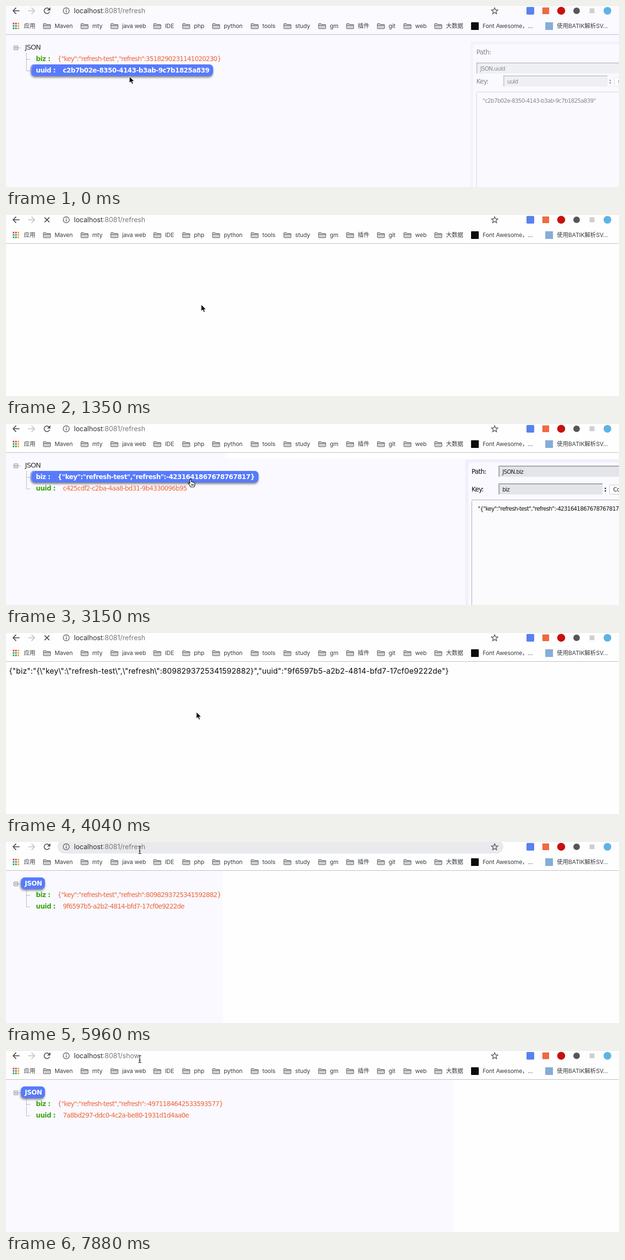
Animation, 1272 px wide and 378 px high, one loop 8 s. Source, as an HTML page with a canvas:

```html
<!DOCTYPE html>
<html lang="zh">
<head>
<meta charset="utf-8">
<title>JSON refresh</title>
<style>
html, body { margin: 0; width: 100%; height: 100%; overflow: hidden; background: #fff; }
canvas { display: block; width: 1272px; height: 378px; }
</style>
</head>
<body>
<canvas id="stage" width="1272" height="378"></canvas>
<script>
const W = 1272, H = 378, LOOP = 8000, TICK = LOOP / 54;
const ctx = document.getElementById('stage').getContext('2d');
const TREE = '"DejaVu Sans", sans-serif';
const UI = 'Inter, "Noto Sans CJK SC", "Noto Sans CJK", sans-serif';
const LAV = '#f9f9ff', BLUE = '#587bfc', RED = '#f0653a', GREEN = '#3ba50c';

const DATA = [
  ['3518290231141020230', 'c2b7b02e-8350-4143-b3ab-9c7b1825a839'],
  ['-4231641867678767817', 'c425cdf2-c2ba-4aa8-bd31-9b4330096b95'],
  ['8098293725341592882', '9f6597b5-a2b2-4814-bfd7-17cf0e9222de'],
  ['-4971184642533593577', '7a8bd297-ddc0-4c2a-be80-1931d1d4aa0e']
].map(([n, uuid]) => ({ uuid, biz: `{"key":"refresh-test","refresh":${n}}` }));

// start time, page kind, data index
const PAGES = [
  [0, 'tree', 0], [1200, 'raw', 1], [1350, 'blank', 1], [1800, 'tree', 1],
  [4040, 'raw', 2], [4790, 'blank', 2], [5080, 'tree', 2],
  [7150, 'raw', 3], [7440, 'blank', 3], [7590, 'tree', 3]
];
const SELECT = [[0, 'uuid'], [450, 'biz'], [1200, 'root'], [2550, 'uuid'], [3000, 'biz'], [4040, 'root']];
const POINTER = [
  [0, 256, 147], [140, 256, 147], [430, 310, 112], [600, 330, 115], [1000, 405, 187],
  [1800, 405, 187], [2350, 356, 142], [2600, 356, 142], [2950, 383, 115], [3290, 383, 115],
  [3700, 395, 165], [4040, 395, 165], [4580, 350, 111], [5180, 350, 111], [5900, 277, 17], [8000, 277, 17]
];
const FOLDERS = [
  [77, 'Maven'], [155, 'mty'], [217, 'java web'], [306, 'IDE'], [366, 'php'], [428, 'python'], [508, 'tools'],
  [576, 'study'], [648, 'gm'], [706, '插件'], [770, 'git'], [825, 'web'], [889, '大数据']
];

const at = (list, t) => list.filter(e => e[0] <= t).pop();
const within = (t, a, b) => t >= a && t < b;

function pointerAt(t) {
  const q = Math.floor(t / TICK + 1e-6) * TICK;
  const i = POINTER.findIndex(p => p[0] > q);
  const a = POINTER[i - 1], b = POINTER[i];
  const u = (q - a[0]) / (b[0] - a[0]);
  const e = u * u * (3 - 2 * u);
  return { x: Math.round(a[1] + (b[1] - a[1]) * e), y: Math.round(a[2] + (b[2] - a[2]) * e) };
}

function text(s, x, y, font, color, gap = 0) {
  ctx.font = font;
  ctx.letterSpacing = gap + 'px';
  ctx.fillStyle = color;
  ctx.fillText(s, x, y);
  return ctx.measureText(s).width;
}
const plain = (s, x, y, color, size = 13.5) => text(s, x, y, `${size}px ${TREE}`, color, -0.059 * size);
const small = (s, x, y, color) => plain(s, x, y, color, 11.6);
const strong = (s, x, y, color) => text(s, x, y, `bold 13.5px ${TREE}`, color, -0.47);

function rect(x, y, w, h, color) {
  ctx.fillStyle = color;
  ctx.fillRect(x, y, w, h);
}
function round(x, y, w, h, r, fill, stroke, width = 1) {
  ctx.beginPath();
  ctx.roundRect(x, y, w, h, r);
  if (fill) { ctx.fillStyle = fill; ctx.fill(); }
  if (stroke) { ctx.strokeStyle = stroke; ctx.lineWidth = width; ctx.stroke(); }
}
function disc(x, y, r, fill) {
  ctx.beginPath();
  ctx.arc(x, y, r, 0, 7);
  ctx.fillStyle = fill;
  ctx.fill();
}
function line(color, width, ...pts) {
  ctx.beginPath();
  pts.forEach(([x, y], i) => i ? ctx.lineTo(x, y) : ctx.moveTo(x, y));
  ctx.strokeStyle = color;
  ctx.lineWidth = width;
  ctx.stroke();
}
function shape(path, x, y, fill, stroke, width = 1) {
  const p = new Path2D(path);
  ctx.save();
  ctx.translate(x, y);
  ctx.lineJoin = 'round';
  ctx.fillStyle = fill;
  ctx.fill(p);
  ctx.strokeStyle = stroke;
  ctx.lineWidth = width;
  ctx.stroke(p);
  ctx.restore();
}

function navIcons(loading) {
  const ink = '#505357';
  line(ink, 1.8, [28, 10], [15, 10]);
  line(ink, 1.8, [21, 3.5], [14.7, 10], [21, 16.5]);
  line('#c4c6c9', 1.8, [46, 10], [59, 10]);
  line('#c4c6c9', 1.8, [53, 3.5], [59.3, 10], [53, 16.5]);
  if (loading) {
    line(ink, 1.8, [80, 5], [90, 15]);
    line(ink, 1.8, [90, 5], [80, 15]);
  } else {
    ctx.beginPath();
    ctx.arc(85, 10, 5.8, 0.35, 5.5);
    ctx.strokeStyle = ink;
    ctx.lineWidth = 1.8;
    ctx.stroke();
    shape('M0 0V6.5H-6.5Z', 92, 2.8, ink, ink, 0.2);
  }
}

function addressBar(t) {
  const focus = within(t, 6250, 7000);
  if (within(t, 5810, 6250)) round(107, -4, 925, 28, 14, '#e8eaed');
  if (focus) round(107, -4, 925, 28, 14, '#fff', '#8ab4f8', 2);
  ctx.beginPath();
  ctx.arc(125, 10, 6.3, 0, 7);
  ctx.strokeStyle = '#5f6368';
  ctx.lineWidth = 1.4;
  ctx.stroke();
  rect(124.2, 9, 1.6, 4.5, '#5f6368');
  rect(124.2, 6, 1.6, 1.7, '#5f6368');

  const font = `14px ${UI}`, path = ':8081/' + (t < 6400 ? 'refresh' : 'show');
  if (within(t, 6250, 6400)) rect(140, 1, 151, 18, '#b3d4fc');
  const w = text('localhost', 141, 15, font, '#2b2d30');
  const pw = text(path, 141 + w, 15, font, focus ? '#2b2d30' : '#74777b');
  if (within(t, 6400, 7000)) rect(142 + w + pw, 2, 1, 16, '#222');

  ctx.beginPath();
  for (let i = 0; i < 10; i++) {
    const a = -Math.PI / 2 + i * Math.PI / 5, r = i % 2 ? 3.1 : 7;
    ctx.lineTo(1014 + r * Math.cos(a), 10.5 + r * Math.sin(a));
  }
  ctx.closePath();
  ctx.strokeStyle = '#55585c';
  ctx.lineWidth = 1.4;
  ctx.stroke();
}

function folder(x, label) {
  shape('M.5 2Q.5 .5 2 .5H5.5L7 2.5H14Q15.5 2.5 15.5 4V10Q15.5 11.5 14 11.5H2Q.5 11.5 .5 10Z', x, 36, '#cfcfd1', '#5d6064');
  line('#5d6064', 1, [x + 1, 40.5], [x + 15, 40.5]);
  bookmark(label, x + 24);
}
const bookmark = (label, x) => text(label, x, 46, `12px ${UI}`, '#3a3c40', -0.1);

function toolbar(t) {
  rect(0, 0, W, 59, t < 1200 ? '#fafaff' : '#fefefe');
  rect(0, 59, W, 1, '#b9b9bd');
  navIcons(within(t, 1050, 1800) || within(t, 3890, 5080) || within(t, 7000, 7590));
  addressBar(t);

  round(1080, 2, 16, 16, 2, '#5a82ee');
  round(1113, 3, 14, 14, 1, '#ee6a42');
  disc(1152, 10, 8.3, '#c8100f');
  disc(1184, 10, 6.8, '#55575a');
  rect(1211, 5, 10, 10, '#cfcfd2');
  disc(1248, 10, 8, within(t, 1050, 1200) || within(t, 3890, 4040) ? '#989a9c' : '#5fb3e4');

  const dots = ['#e8453c', '#e8453c', '#f2a73b', '#35a853', '#4285f4', '#f2a73b', '#35a853', '#35a853', '#f2a73b'];
  dots.forEach((c, i) => rect(14 + i % 3 * 5, 35 + Math.floor(i / 3) * 5, 3.4, 3.4, c));
  bookmark('应用', 37);
  FOLDERS.forEach(f => folder(...f));
  round(965, 34, 16, 16, 1, '#0c0c0c');
  bookmark('Font Awesome，...', 989);
  rect(1119, 34, 16, 16, '#85add6');
  bookmark('使用BATIK解析SV...', 1143);
}

function pill(x, y, w) {
  ctx.save();
  ctx.shadowColor = 'rgba(60,60,70,.65)';
  ctx.shadowBlur = 4;
  ctx.shadowOffsetX = -1;
  ctx.shadowOffsetY = 3;
  round(x, y, w, 24, 8, BLUE);
  ctx.restore();
}

function row(key, value, y, valueX, picked, hover) {
  if (picked) {
    ctx.font = `bold 13.5px ${TREE}`;
    ctx.letterSpacing = '-0.47px';
    pill(53, y - 12, valueX + ctx.measureText(value).width + 8 - 53);
  }
  if (hover) {
    ctx.beginPath();
    ctx.arc(60, y - 4, 8.5, Math.PI, 4.4);
    ctx.moveTo(51.5, y - 4);
    ctx.lineTo(51.5, y + 4);
    ctx.arc(60, y + 4, 8.5, Math.PI, 1.9, true);
    ctx.strokeStyle = '#6f8cf5';
    ctx.lineWidth = 1.2;
    ctx.stroke();
  }
  strong(key + ' :', 62, y + 5, picked ? '#fff' : GREEN);
  (picked || hover ? strong : plain)(value, valueX, y + 5, picked ? '#fff' : RED);
}

function tree(d, pick, hover) {
  ctx.setLineDash([1, 1]);
  line('#777', 1, [25, 87.5], [30, 87.5]);
  line('#777', 1, [42.5, 98], [42.5, 135]);
  line('#777', 1, [43, 111.5], [51, 111.5]);
  line('#777', 1, [43, 135.5], [51, 135.5]);
  ctx.setLineDash([]);
  round(16.5, 83.5, 8, 8, 0, '#fff', '#777');
  line('#222', 1, [18, 87.5], [23, 87.5]);
  if (pick === 'root') {
    pill(31, 74, 50);
    strong('JSON', 39, 91, '#fff');
  } else {
    plain('JSON', 39.5, 91, '#333', 14.5);
  }
  row('biz', d.biz, 110, 107, pick === 'biz', hover === 'biz');
  row('uuid', d.uuid, 134, 118, pick === 'uuid', hover === 'uuid');
}

function field(x, y, w, label) {
  rect(x, y, w, 23, '#e3e5e9');
  rect(x, y, w, 2, '#a0a2a6');
  rect(x, y, 2, 23, '#a0a2a6');
  small(label, x + 8, y + 17, '#222');
}

function panel(key, value, fading) {
  const x = fading ? 963 : 953, low = fading ? 21 : 0;
  ctx.save();
  rect(x, 74, W - x, H, fading ? '#f2f3fc' : '#eff0fc');
  round(x + 6, 80, W, H, 8, LAV);
  if (fading) ctx.globalAlpha = 0.48;
  plain('Path:', x + 13, fading ? 101 : 104, '#111');
  if (fading) field(x + 13, 118, W, 'JSON.' + key);
  else field(x + 69, 87, W, 'JSON.' + key);
  plain('Key:', x + 13, 141 + low, '#111');
  field(x + 69, 124 + low, 216, key);
  strong(':', x + 288, 141 + low, '#111');
  round(x + 299.5, 127.5 + low, 60, 19, 2, '#fff', '#c4c4c8');
  small('Copy', x + 307, 141 + low, '#222');
  round(x + 13.5, 158.5 + low, W, H, 3, '#fbfbfd', '#a9a9ae');
  small(`"${value}"`, x + 26, 181 + low, '#111');
  ctx.restore();
}

function pointer(x, y, kind) {
  if (kind === 'beam') {
    const arms = 'M-3 -8Q0 -8 0 -5.5Q0 -8 3 -8M0 -6V5.5M-3 7.5Q0 7.5 0 5Q0 7.5 3 7.5M-2 2H2';
    shape(arms, x + 0.5, y, 'transparent', '#fff', 2.6);
    shape(arms, x + 0.5, y, 'transparent', '#111', 1.2);
  } else if (kind === 'hand') {
    shape('M-1.5 1Q0 -.8 1.5 1V6L3 5.5L4.5 6.5L6 6.3L7 7.5Q9 7 9 9V12L7.5 16.5H0L-2 13L-5 9Q-4.5 7 -2.5 8.5L-1.5 9.5Z', x, y, '#fff', '#111', 1.2);
    [2, 4, 6].forEach(k => line('#111', 1, [x + k, y + 10], [x + k, y + 14]));
  } else {
    shape('M0 0V14L3.2 11L5.5 16.2L8 15.1L5.8 10.2H10.2Z', x, y, '#0a0a0a', '#fff');
  }
}

function draw(t) {
  const [start, kind, index] = at(PAGES, t), d = DATA[index];
  const pick = at(SELECT, t)[1], p = pointerAt(t), open = pick !== 'root';
  rect(0, 0, W, H, '#fefefe');
  toolbar(t);

  let hover = '', mark = 'arrow';
  if (kind === 'tree') {
    // lavender page fills in only partly until the side panel opens
    const edge = start === 0 ? W : [455, 455, 450, 929][index];
    rect(0, 60, edge, H, LAV);
    if (open) rect(0, 73, W, H, LAV);
    if (p.y >= 98 && p.y < 148 && p.x < 520) {
      hover = p.y < 122 ? 'biz' : 'uuid';
      if (p.y < 146) mark = 'hand';
    }
    tree(d, pick, hover);
    if (open) panel(pick, d[pick], t < 150 || within(t, 2550, 2700));
  } else if (kind === 'raw') {
    const raw = JSON.stringify({ biz: d.biz, uuid: d.uuid });
    text(raw, 6.5, 84.5, `15.8px ${UI}`, '#0a0a0a', 0.14);
  }
  if (p.y < 26) mark = 'beam';
  pointer(p.x, p.y, mark);
}

const begin = performance.now();
function loop() {
  draw((performance.now() - begin) % LOOP);
  requestAnimationFrame(loop);
}
loop();
</script>
</body>
</html>
```
